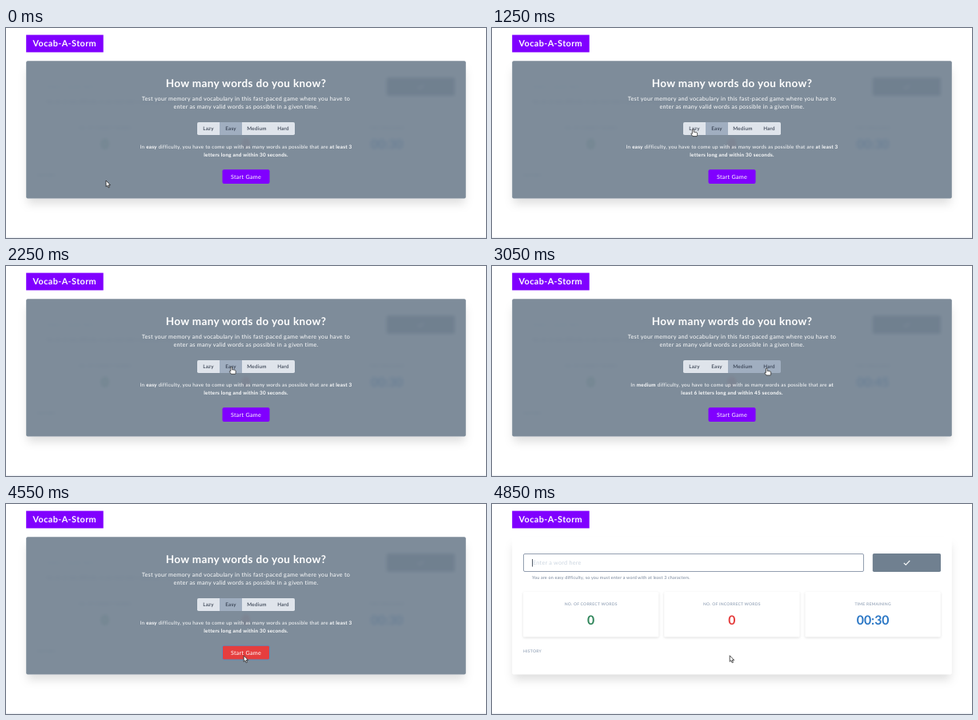
An HTML page for the animation above (5000 ms loop, 600 by 263 pixels).

```html
<!DOCTYPE html>
<html lang="en">
<head>
<meta charset="utf-8">
<title>Word game</title>
<style>
  html, body { margin: 0; width: 100%; height: 100%; overflow: hidden; background: #fff; }
  svg { display: block; width: 600px; height: 263px; }
  text { font-family: Lato, "Open Sans", sans-serif; letter-spacing: .038em; text-rendering: geometricPrecision; }
  .mid { text-anchor: middle; }
  .bold { font-weight: 700; }
  .title { font-size: 13.5px; letter-spacing: .027em; }
  .base { font-size: 7.2px; }
  .small { font-size: 6.3px; }
  .choice { font-weight: 500; fill: #2d3748; }
  .hint { font-size: 5.4px; letter-spacing: .034em; fill: #718096; }
  .label { font-size: 5px; font-weight: 700; letter-spacing: .05em; fill: #a0aec0; }
  .count { font-size: 15.8px; font-weight: 700; letter-spacing: 0; }
  .light { fill: #fff; }
  .slate { fill: #708090; }
  .card { fill: #fff; filter: drop-shadow(0 1.5px 1.4px rgba(0, 0, 0, .13)); }
  .shade { fill: #fff; filter: drop-shadow(0 9px 5.6px rgba(0, 0, 0, .13)); }
  .blurred { filter: blur(2.2px); }
  #cursor path { fill: #fff; stroke: #222; stroke-width: .8; stroke-linejoin: round; }
</style>
</head>
<body>
<svg viewBox="0 0 600 263">
  <defs>
    <clipPath id="round"><rect x="239" y="118" width="122" height="16" rx="1.8"/></clipPath>
    <rect id="panel" x="25.2" y="41.2" width="549.6" height="172.3" rx="2"/>
  </defs>

  <rect y="261.7" width="600" height="1.3" fill="#eef1f6"/>
  <rect x="25.2" y="8.6" width="96.5" height="21.8" fill="#8000ff"/>
  <text class="mid bold light" x="73.3" y="23" font-size="10.8">Vocab-A-Storm</text>

  <rect class="shade" x="27" y="43" width="546" height="168"/>
  <use href="#panel" fill="#fff"/>

  <g id="game">
    <rect id="field" x="39.5" y="62.5" width="425" height="22" rx="1.5" fill="#fff" stroke-width=".9"/>
    <text class="base" x="51" y="76.2" fill="#cbd5e0">Enter a word here</text>
    <rect id="caret" x="50.2" y="69" width=".8" height="9.5" fill="#2d3748"/>
    <rect class="slate" x="475.8" y="62" width="85.2" height="23" rx="1.8"/>
    <path d="M514.8 73.8l2.5 2.4 5-5.4" fill="none" stroke="#fff" stroke-width="1.1"/>
    <text class="hint" x="50" y="94">You are on easy difficulty, so you must enter a word with at least 3 characters.</text>
    <g id="cards"></g>
    <text class="label" x="39" y="186.4">HISTORY</text>
  </g>

  <g id="intro">
    <use href="#panel" class="slate" opacity=".9"/>
    <text class="mid bold light title" x="300" y="74.3">How many words do you know?</text>
    <text class="mid base light" x="300" y="90.7">Test your memory and vocabulary in this fast-paced game where you have to</text>
    <text class="mid base light" x="300" y="101.3">enter as many valid words as possible in a given time.</text>
    <g id="levels" clip-path="url(#round)"></g>
    <text class="mid small light" x="300" y="151.3">In <tspan id="level" class="bold"></tspan> difficulty, you have to come up with as many words as possible that are <tspan id="tail" class="bold"></tspan></text>
    <text id="rest" class="mid small light bold" x="300" y="160.6"></text>
    <rect id="start" x="270.5" y="177.2" width="59" height="17.8" rx="2"/>
    <text class="mid base light" x="300" y="188.8">Start Game</text>
  </g>

  <g id="cursor">
    <path id="arrow" d="M0 0V7.6L1.7 6.1 3 9 4.3 8.4 3.1 5.7H5.5Z"/>
    <path id="hand" transform="scale(.92)" d="M-1.2 5.4V.5a1 1 0 0 1 2 0V3.2h1.6q3.2 0 3.2 1.6V7q0 1.2-.6 2H-.6L-2.8 6q-.3-1.2 1-.8z"/>
  </g>
</svg>

<script>
const LOOP = 5000, TICK = 50;
const $ = id => document.getElementById(id);
const show = (id, on) => { $(id).style.display = on ? '' : 'none'; };

function add(parent, tag, attrs, text = '') {
  const node = document.createElementNS('http://www.w3.org/2000/svg', tag);
  for (const key in attrs) node.setAttribute(key, attrs[key]);
  node.textContent = text;
  return parent.appendChild(node);
}

const levels = [
  { name: 'Lazy', width: 28, tail: 'at least 3', rest: 'letters long and within 0 seconds.', time: '--:--' },
  { name: 'Easy', width: 28, tail: 'at least 3', rest: 'letters long and within 30 seconds.', time: '00:30' },
  { name: 'Medium', width: 37, tail: 'at', rest: 'least 6 letters long and within 45 seconds.', time: '00:45' },
  { name: 'Hard', width: 29, tail: 'at least 9', rest: 'letters long and within 60 seconds.', time: '01:00' }
];
const [LAZY, EASY, MEDIUM, HARD] = levels;

let left = 239;
for (const level of levels) {
  const { name, width } = level;
  level.box = add($('levels'), 'rect', { x: left, y: 118, width, height: 16 });
  add($('levels'), 'text', { class: 'mid small choice', x: left + width / 2, y: 128.2 }, name);
  left += width;
}

const counts = [
  ['NO. OF CORRECT WORDS', '0', '#2f855a'],
  ['NO. OF INCORRECT WORDS', '0', '#e53e3e'],
  ['TIME REMAINING', '00:30', '#2b77c5']
].map(([label, value, fill], i) => {
  const x = 39 + 176.2 * i, width = 169.4, mid = x + width / 2;
  add($('cards'), 'rect', { class: 'card', x, y: 110, width, height: 56.5, rx: 1.5 });
  add($('cards'), 'text', { class: 'mid label', x: mid, y: 126.9 }, label);
  return add($('cards'), 'text', { class: 'mid count', x: mid, y: 150.6, fill }, value);
});

// Each move starts with an optional click, then glides to a point
const moves = [
  { at: 0, to: [312, 123], bend: [[0, 20], [130, -22]], time: 600 },
  { at: 850, to: [243.5, 120.5], bend: [[310, 160], [300, 170]], time: 500 },
  { at: 1750, pick: LAZY, to: [282, 127] },
  { at: 2250, pick: EASY, to: [315, 127] },
  { at: 2650, pick: MEDIUM, to: [343.5, 128.6] },
  { at: 3150, pick: HARD, to: [251, 126] },
  { at: 3550, pick: LAZY, to: [273, 122] },
  { at: 3950, pick: EASY, to: [297.2, 189.8] }
];
const PRESS = 4550, PLAY = 4600, FOCUS = 4650;

let from = [125, 191];
for (const move of moves) {
  const { to } = move;
  move.from = from;
  move.bend ??= [from, to];
  move.time ??= Math.min(250, 4 * Math.hypot(to[0] - from[0], to[1] - from[1]));
  from = to;
}

function pointAt(t) {
  const { at, from, bend: [b, c], to, time } = moves.findLast(move => move.at <= t);
  const k = Math.sin(Math.min(1, (t - at) / time) * Math.PI / 2), u = 1 - k;
  return [0, 1].map(i => u ** 3 * from[i] + 3 * u * u * k * b[i] + 3 * u * k * k * c[i] + k ** 3 * to[i]);
}

function isOver(node, [x, y]) {
  const size = name => +node.getAttribute(name);
  const dx = x - size('x'), dy = y - size('y');
  return dx >= 0 && dx < size('width') && dy >= 0 && dy < size('height');
}

function draw(t) {
  const point = pointAt(t);
  const hoverPoint = pointAt(Math.max(0, t - TICK));  // hover colours lag one tick
  const pick = moves.findLast(move => move.pick && move.at <= t)?.pick ?? EASY;
  const playing = t >= PLAY, focused = t >= FOCUS;
  const overLevels = levels.some(({ box }) => isOver(box, point));

  for (const level of levels) {
    const active = level === pick || isOver(level.box, hoverPoint);
    level.box.setAttribute('fill', active ? '#a0aec0' : '#dfe4eb');
  }
  $('level').textContent = pick.name.toLowerCase();
  $('tail').textContent = pick.tail;
  $('rest').textContent = pick.rest;
  counts[2].textContent = pick.time;

  $('start').setAttribute('fill', isOver($('start'), hoverPoint) ? '#e53e3e' : '#8000ff');
  $('start').setAttribute('stroke', t >= PRESS ? '#5a8dbb' : 'none');
  $('game').setAttribute('class', playing ? '' : 'blurred');
  $('field').setAttribute('stroke', focused ? '#8795a8' : '#e2e8f0');

  show('intro', !playing);
  show('caret', focused);
  show('hand', overLevels);
  show('arrow', !overLevels);
  $('cursor').setAttribute('transform', `translate(${point})`);
}

const begin = performance.now();
function frame() {
  const t = (performance.now() - begin) % LOOP;
  draw(Math.floor(t / TICK) * TICK);
  requestAnimationFrame(frame);
}
frame();
</script>
</body>
</html>
```
